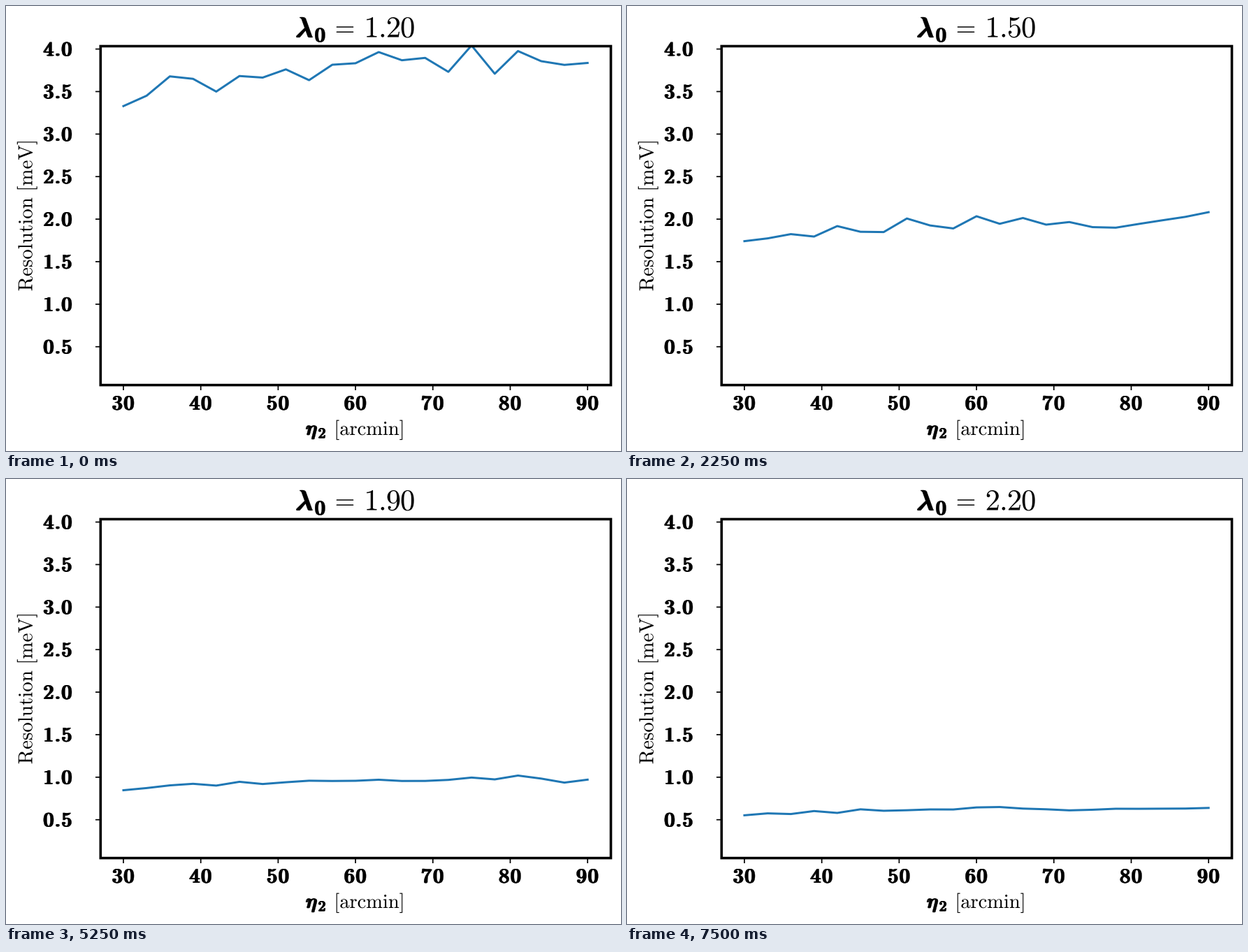
Animation of 880x637 px, one loop 8000 ms. Source, as a matplotlib script:

```python
import numpy as np
import matplotlib.pyplot as plt
from matplotlib.animation import FuncAnimation
from matplotlib.patches import PathPatch, Rectangle
from matplotlib.path import Path
from matplotlib.textpath import TextPath
from matplotlib.transforms import Affine2D

plt.rcParams["mathtext.fontset"] = "cm"

W, H, DPI = 880, 637, 64
PT = 72 / DPI                       # points per pixel
LEFT, RIGHT, TOP, BOTTOM = 135.3, 865.5, 57.5, 542.6
STEPS = 11

etas = np.arange(30, 91, 3)
lambdas = 1.2 + 0.1 * np.arange(STEPS)
rng = np.random.default_rng(4)


def resolution(lam):
    """Inverse-cube law in wavelength, saturating in eta, with scatter."""
    trend = 1.04 - 0.14 * np.exp(-(etas - 30) / 18)
    scatter = 0.023 * rng.standard_normal(etas.size).clip(-2, 2)
    return 6.5 / lam ** 3 * (trend + scatter)


def px(eta):
    return 168 + (eta - 30) * 664.2 / 60


def py(res):
    return 61.6 + (4 - res) * 121.75


fig = plt.figure(figsize=(W / DPI, H / DPI), dpi=DPI, facecolor="white")
ax = fig.add_axes([0, 0, 1, 1])
ax.set_xlim(0, W)
ax.set_ylim(H, 0)
ax.axis("off")


def glyphs(tex, center, base, size, turn=0):
    """Outline of a math string, centred on its ink along the baseline."""
    path = TextPath((0, 0), f"${tex}$", size=size)
    box = path.get_extents()
    move = Affine2D().translate(-(box.x0 + box.x1) / 2, 0).scale(1, -1)
    return path.transformed(move.rotate_deg(turn).translate(center, base))


def number(text, x, base, size, digit, dot):
    """Outline of a number set on fixed advances, starting at x."""
    parts = []
    for ch in text:
        step = dot if ch == "." else digit
        parts.append(glyphs(rf"\mathrm{{{ch}}}", x + step / 2, base, size))
        x += step
    return Path.make_compound_path(*parts)


def ink(path, stroke=0):
    return ax.add_patch(PathPatch(path, facecolor="black", edgecolor="black",
                                  linewidth=stroke * PT, joinstyle="round", zorder=4))


def bold(path, size):
    """Thicken the stems more than the hairlines by overprinting sideways."""
    for shift in (-0.036, 0, 0.036):
        ink(path.transformed(Affine2D().translate(shift * size, 0)), 0.4)


def bold_number(text, x, base, size=29):
    bold(number(text, x, base, size, 0.575 * size, 0.319 * size), size)


def title_value(lam):
    return number(f"{lam:.2f}", 513.2, 44.7, 42.8, 20.2, 11)


def tick(xs, ys):
    ax.plot(xs, ys, color="black", lw=1.7 * PT, solid_capstyle="butt",
            zorder=3, snap=False)


# Frame, ticks and tick labels
ax.add_patch(Rectangle((LEFT, TOP), RIGHT - LEFT, BOTTOM - TOP, fill=False,
                       edgecolor="black", lw=3.6 * PT, joinstyle="miter",
                       zorder=3, snap=False))
for eta in range(30, 91, 10):
    tick([px(eta)] * 2, [BOTTOM, 550])
    bold_number(str(eta), px(eta) - 17.1, 577.7)
for half in range(1, 9):
    y = py(half / 2)
    tick([128, LEFT], [y, y])
    bold_number(f"{half / 2:.1f}", 52.6, y + 9.6)

# Axis labels
bold(glyphs(r"\eta", 437, 614, 29.5), 29.5)
bold_number("2", 446, 618.3, 21)
ink(glyphs(r"\mathrm{[arcmin]}", 520, 614, 28.5))
ink(glyphs(r"\mathrm{Resolution\ [meV]}", 37.5, 300.8, 29, -90))

# Title
bold(glyphs(r"\lambda", 427, 44.7, 41), 41)
bold_number("0", 441, 51, 29)
ink(glyphs("=", 485, 43, 37))

titles = [title_value(lam) for lam in lambdas]
curves = [resolution(lam) for lam in lambdas]
value = ink(titles[0])
line, = ax.plot([], [], color="#1f77b4", lw=3 * PT, solid_joinstyle="round",
                solid_capstyle="projecting", zorder=2)
line.set_clip_path(Rectangle((LEFT, TOP), RIGHT - LEFT, BOTTOM - TOP,
                             transform=ax.transData))


def draw(n):
    k = min(n // 3, STEPS - 1)
    line.set_data(px(etas), py(curves[k]))
    value.set_path(titles[k])
    return line, value


anim = FuncAnimation(fig, draw, frames=32, interval=250, repeat=True,
                     repeat_delay=0, blit=False)
plt.show()
```
